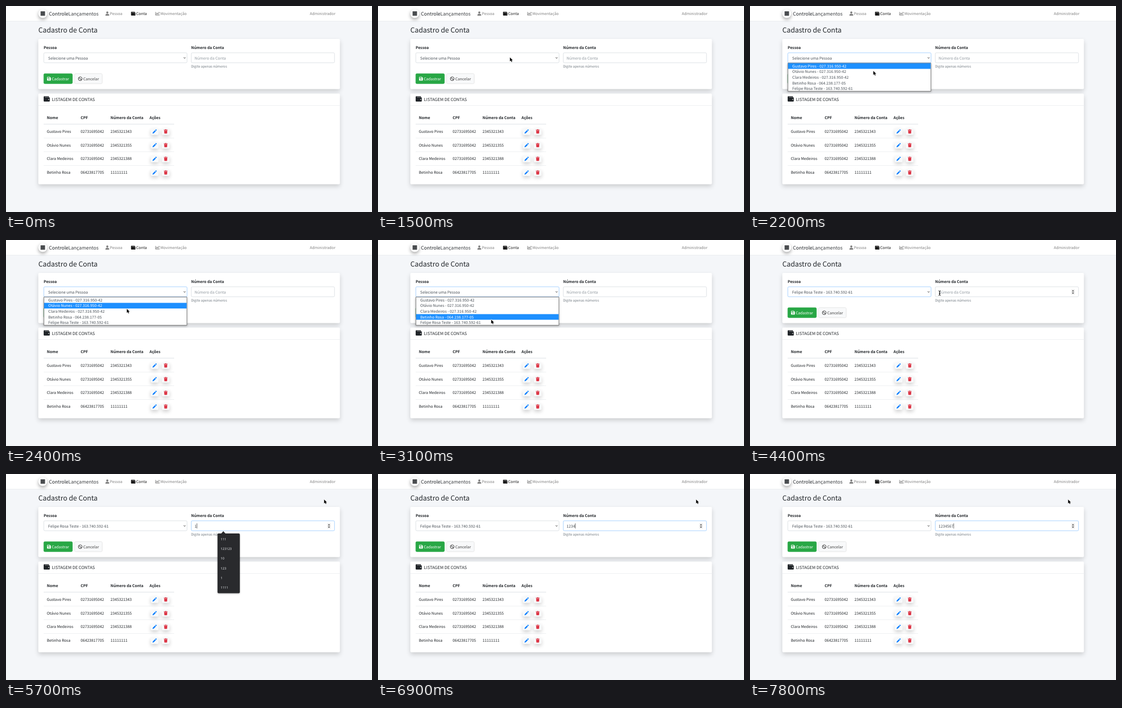
An HTML page with a canvas that plays this animation: 690x388 px, repeating every 8000 ms.

```html
<!DOCTYPE html>
<html lang="pt-BR">
<head>
<meta charset="utf-8">
<title>Cadastro de Conta</title>
<style>
  html, body { margin: 0; width: 100%; height: 100%; overflow: hidden; background: #f4f6f9; }
  canvas { display: block; }
</style>
</head>
<body>
<canvas id="stage" width="690" height="388"></canvas>
<script>
const ctx = document.getElementById('stage').getContext('2d');
const LOOP = 8000, STEP = 100;
const UNIT = 690 / 1366;               // page pixel on the stage
const BODY = 16 * UNIT;
const SANS = '"Noto Sans CJK JP", "Noto Sans CJK SC", "Noto Sans CJK", "Open Sans", sans-serif';
const LATIN_SCALE = 1.117;             // the CJK family draws Latin letters enlarged
const DARK = '#212529', GRAY = '#495057', MUTED = '#808080', LINE = '#dee2e6';
const BLUE = '#007bff', FOCUS = '#80bdff';

const people = [
  { name: 'Gustavo Pires', cpf: '027.316.950-42', account: '2345321343' },
  { name: 'Otávio Nunes', cpf: '027.316.950-42', account: '2345321355' },
  { name: 'Clara Medeiros', cpf: '027.316.950-42', account: '2345321388' },
  { name: 'Betinho Rosa', cpf: '064.238.177-05', account: '11111111' },
  { name: 'Felipe Rosa Teste', cpf: '163.740.592-61' }
];
const optionText = p => `${p.name} - ${p.cpf}`;

const icons = {
  user: { fill: 'M8 0a4 4 0 1 0 .01 0zM1 16v-2a5 5 0 0 1 5-5h4a5 5 0 0 1 5 5v2z' },
  wallet: { fill: 'M2 1h11a1 1 0 0 1 1 1v1H3v1h11a2 2 0 0 1 2 2v7a2 2 0 0 1-2 2H2a2 2 0 0 1-2-2V3a2 2 0 0 1 2-2zM13 8.5a1 1 0 1 0 .01 0z' },
  chart: { fill: 'M0 2h2v10h14v2H0zM11 2.5h4.5V7z', line: 'M3.5 9.5l3-3.5 3 3 4-4' },
  save: { fill: 'M2 1h9.5L15 4.5V14a1 1 0 0 1-1 1H2a1 1 0 0 1-1-1V2a1 1 0 0 1 1-1zM3 3v3.5h7.5V3zM8 8.7a2 2 0 1 0 .01 0z' },
  ban: { line: 'M8 1.2a6.8 6.8 0 1 0 .01 0zM3.2 3.2l9.6 9.6' },
  pencil: { fill: 'M9.3 3.3l3.4 3.4-8.1 8.1L0 16l1.2-4.6zM10.4 2.2L12 .6a1.5 1.5 0 0 1 2 0L15.4 2a1.5 1.5 0 0 1 0 2l-1.6 1.6z' },
  trash: { fill: 'M1 1.5h4.2L6 0h4l.8 1.5H15v1.7H1zM2 4.3h12l-.7 10.3a1.5 1.5 0 0 1-1.5 1.4H4.2a1.5 1.5 0 0 1-1.5-1.4z' }
};

// Pointer path: time, x, y
const path = [
  [800, 437, 190], [1100, 352, 150], [1400, 254, 108], [1500, 248.7, 96.8],
  [2000, 248.7, 96.8], [2200, 232.5, 122.3], [2600, 223, 137], [3100, 213.4, 150],
  [3400, 213.4, 153], [3900, 300, 122], [4300, 355.5, 100.5], [4400, 357.5, 100],
  [4700, 357.5, 100], [4900, 599.7, 48]
];
const keyTimes = [5700, 6000, 6400, 6900, 7100, 7400, 7800];

function text(str, x, cy, { size = BODY, color = DARK, weight = 400, align = 'left', family = SANS } = {}) {
  const px = family === SANS ? size / LATIN_SCALE : size;
  ctx.font = `${weight} ${px}px ${family}`;
  ctx.textAlign = align;
  ctx.fillStyle = color;
  ctx.fillText(str, x, cy + size * 0.33);
  return x + ctx.measureText(str).width;
}

function box(x, y, w, h, { fill, stroke, radius = 2, shadow } = {}) {
  ctx.save();
  ctx.beginPath();
  ctx.roundRect(x, y, w, h, radius);
  if (shadow) {
    ctx.shadowColor = `rgba(0,0,0,${shadow.alpha})`;
    ctx.shadowBlur = shadow.blur;
    ctx.shadowOffsetY = shadow.y;
  }
  if (fill) { ctx.fillStyle = fill; ctx.fill(); }
  if (stroke) { ctx.strokeStyle = stroke; ctx.lineWidth = 0.7; ctx.stroke(); }
  ctx.restore();
}

function rule(x, y, w, h = UNIT, color = LINE) {
  ctx.fillStyle = color;
  ctx.fillRect(x, y, w, h);
}

function icon(name, cx, cy, size, color) {
  const { fill, line } = icons[name];
  ctx.save();
  ctx.translate(cx - size / 2, cy - size / 2);
  ctx.scale(size / 16, size / 16);
  ctx.fillStyle = ctx.strokeStyle = color;
  ctx.lineWidth = 2.1;
  if (fill) ctx.fill(new Path2D(fill), 'evenodd');
  if (line) ctx.stroke(new Path2D(line));
  ctx.restore();
}

function polygon(points, color) {
  ctx.beginPath();
  points.forEach(([x, y]) => ctx.lineTo(x, y));
  ctx.closePath();
  ctx.fillStyle = color;
  ctx.fill();
}

function drawNavbar() {
  rule(0, 0, 690, 28.3, '#fff');
  rule(0, 28.2, 690);
  box(61, 6, 16.6, 16.6, { fill: '#fff', radius: 8.3, shadow: { alpha: 0.35, blur: 6, y: 3 } });
  box(65.2, 10, 8.4, 8.4, { fill: '#4a4d50', radius: 0 });
  const end = text('Controle', 81, 14.5, { size: 20 * UNIT });
  text('Lançamentos', end, 14.5, { size: 20 * UNIT, weight: 300, color: '#3c3f42' });
  icon('user', 191, 14.2, 8, MUTED);
  text('Pessoa', 195.8, 14.7, { color: MUTED });
  icon('wallet', 239.9, 14.3, 8.4, '#1a1a1a');
  text('Conta', 245.5, 14.7, { color: '#1a1a1a' });
  icon('chart', 285.6, 14.3, 8.2, MUTED);
  text('Movimentação', 291, 14.7, { color: MUTED });
  text('Administrador', 621, 14.7, { color: MUTED, align: 'right' });
}

function drawCards() {
  const card = { fill: '#fff', shadow: { alpha: 0.17, blur: 8, y: 4 } };
  box(61, 62, 568.5, 94.6, card);
  box(61, 165, 568.5, 170.8, card);
  text('Cadastro de Conta', 61, 45.3, { size: 28.8 * UNIT });
  text('Pessoa', 71, 78.2, { weight: 700 });
  text('Número da Conta', 349, 78.2, { weight: 700 });
  text('Digite apenas números', 349, 114, { size: 14 * UNIT, color: '#6c757d' });

  box(71.2, 127.4, 54, 18.9, { fill: '#28a745', stroke: '#28a745' });
  icon('save', 81, 137, 8, '#fff');
  text('Cadastrar', 86.2, 137.2, { color: '#fff' });
  box(129.4, 127.4, 52, 18.9, { fill: '#f8f9fa', stroke: '#ddd' });
  icon('ban', 139.9, 137, 8.2, '#444');
  text('Cancelar', 145.7, 137.2, { color: '#444' });
}

function drawTable() {
  icon('wallet', 76.8, 175, 11.6, DARK);
  text('LISTAGEM DE CONTAS', 86.5, 175.8, { size: 17.6 * UNIT });
  rule(61, 187.3, 568.5);
  const columns = [77, 140.7, 197, 270.5];
  ['Nome', 'CPF', 'Número da Conta', 'Ações'].forEach((label, i) =>
    text(label, columns[i], 210.6, { weight: 700 }));
  rule(71, 222, 246, 2 * UNIT);
  people.filter(p => p.account).forEach((p, row) => {
    const y = 236.1 + row * 25.75;
    if (row) rule(71, y - 13.2, 246);
    [p.name, p.cpf.replace(/\D/g, ''), p.account].forEach((value, i) => text(value, columns[i], y));
    [['pencil', 280.2, BLUE], ['trash', 301.1, '#dc3545']].forEach(([name, x, color]) => {
      box(x - 7.3, y - 5.9, 14.6, 12.6, { fill: '#f8f9fa', shadow: { alpha: 0.18, blur: 7, y: 3.5 } });
      icon(name, x, y + 0.2, 8, color);
    });
  });
}

function drawSelect(t) {
  const chosen = t >= 3500;
  box(71.3, 88.1, 270, 18.8, { fill: '#fff', stroke: t >= 1700 && t < 4700 ? FOCUS : '#ced4da' });
  text(chosen ? optionText(people[4]) : 'Selecione uma Pessoa', 79.6, 98, { color: GRAY });
  ctx.beginPath();
  ctx.moveTo(334.9, 96.8);
  ctx.lineTo(336.7, 98.7);
  ctx.lineTo(338.5, 96.8);
  ctx.strokeStyle = '#333';
  ctx.lineWidth = 1;
  ctx.stroke();
}

function drawOptions(t) {
  if (t < 1700 || t >= 3500) return;
  const active = [2300, 2600, 2900, 3200].filter(at => t >= at).length;
  box(71.4, 107.4, 269.6, 53.2, { fill: '#fff', stroke: '#555', radius: 0, shadow: { alpha: 0.25, blur: 4, y: 1.5 } });
  people.forEach((p, i) => {
    const y = 113.1 + i * 10.6;
    if (i === active) rule(71.8, y - 5.3, 268.8, 10.6, '#1e90ff');
    text(optionText(p), 79.8, y, { color: i === active ? '#fff' : GRAY });
  });
}

function drawInput(t) {
  const typed = '1234567'.slice(0, keyTimes.filter(at => t >= at).length);
  const focused = t >= 4700;
  box(349.3, 88.1, 270, 18.8, { fill: '#fff', stroke: focused ? FOCUS : '#ced4da' });
  let end = 355.5;
  if (typed) end = text(typed, end, 98, { color: GRAY });
  else text('Número da Conta', end, 98, { color: '#939ba2' });

  if (t >= 4200) {
    box(605.5, 92.6, 6.8, 10.4, { fill: '#efefef', radius: 1 });
    polygon([[607, 96.7], [608.9, 94.2], [610.8, 96.7]], '#444');
    polygon([[607, 98.9], [608.9, 101.4], [610.8, 98.9]], '#444');
  }
  const lastKey = keyTimes.filter(at => t >= at).pop() ?? 4700;
  if (focused && (t - lastKey) % 1000 < 500) rule(end + 0.1, 93, 0.7, 9.6, '#222');
}

function drawSuggestions(t) {
  if (t < 4700 || t >= 6900) return;
  const items = t < 5700 ? ['111', '123123', '10', '123', '1', '22222']
    : t < 6000 ? ['111', '123123', '10', '123', '1', '1111']
    : t < 6400 ? ['123123', '123', '12'] : ['123123', '123'];
  const fill = '#292a2d';
  box(398.8, 112, 42, 3.3 + items.length * 18.2, { fill, shadow: { alpha: 0.3, blur: 3, y: 1 } });
  polygon([[405.5, 112.3], [409.7, 107.8], [413.9, 112.3]], fill);
  items.forEach((item, i) => text(item, 404.8, 123 + i * 18.2,
    { size: 12 * UNIT, color: '#e8eaed', family: '"Noto Sans", sans-serif' }));
}

function pointerAt(t) {
  const next = path.findIndex(([at]) => at > t);
  if (next < 0) return path[path.length - 1].slice(1);
  const [t0, x0, y0] = path[next - 1], [t1, x1, y1] = path[next];
  const k = (t - t0) / (t1 - t0);
  return [x0 + (x1 - x0) * k, y0 + (y1 - y0) * k];
}

function drawPointer(t) {
  if (t < path[0][0]) return;
  const [x, y] = pointerAt(t);
  ctx.save();
  ctx.translate(x, y);
  ctx.lineJoin = 'round';
  if (t >= 4200 && t < 4800) {
    const beam = new Path2D('M-2-4.3Q0-4.3 0-3V3Q0 4.3-2 4.3M2-4.3Q0-4.3 0-3M0 3Q0 4.3 2 4.3M-1.3.8H1.3');
    [['#fff', 2.2], ['#000', 1]].forEach(([color, width]) => {
      ctx.strokeStyle = color;
      ctx.lineWidth = width;
      ctx.stroke(beam);
    });
  } else {
    const arrow = new Path2D('M0 0V7.5L1.8 5.9 3 8.6 4.3 8.1 3.1 5.4H5.4z');
    ctx.strokeStyle = '#fff';
    ctx.lineWidth = 1.2;
    ctx.stroke(arrow);
    ctx.fillStyle = '#000';
    ctx.fill(arrow);
  }
  ctx.restore();
}

function render(now) {
  const t = Math.floor((now % LOOP) / STEP) * STEP;
  rule(0, 0, 690, 388, '#f4f6f9');
  drawNavbar();
  drawCards();
  drawTable();
  drawSelect(t);
  drawInput(t);
  drawOptions(t);
  drawSuggestions(t);
  drawPointer(t);
}

const start = performance.now();
function tick() {
  render(performance.now() - start);
  requestAnimationFrame(tick);
}
ctx.textRendering = 'geometricPrecision';
tick();
</script>
</body>
</html>
```
